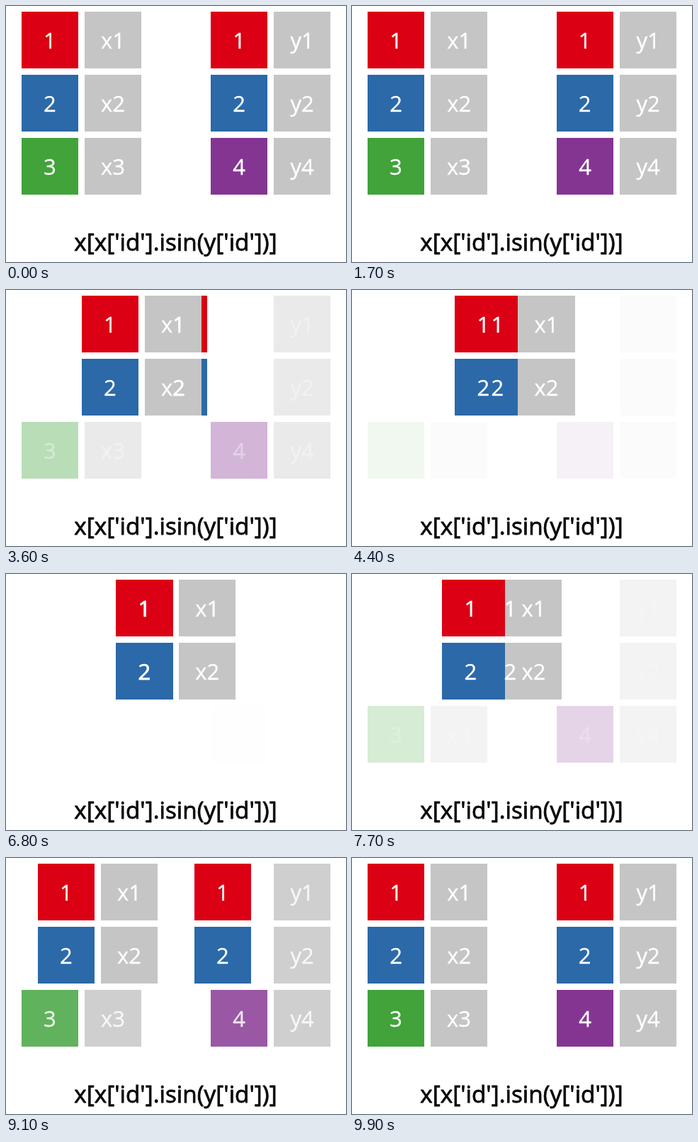
Recreate the animation shown at these times as an HTML page with a canvas. Size 480 by 361 pixels, loop 10000 ms.

```html
<!DOCTYPE html>
<html lang="en">
<head>
<meta charset="utf-8">
<title>Semi join</title>
<style>
  html, body { margin: 0; width: 100%; height: 100%; overflow: hidden; background: #fff; }
  canvas { display: block; }
</style>
</head>
<body>
<canvas id="stage" width="480" height="361"></canvas>
<script>
const ctx = document.getElementById('stage').getContext('2d');
const LOOP = 10000, STEP = 100;
const X0 = 21.8, Y0 = 8, UNIT = 89.05, SIZE = 80.1;
const FAMILY = '"Open Sans", "Noto Sans", sans-serif';
const GREY = '#c5c5c5';
const COLORS = { 1: '#db0014', 2: '#2b69a9', 3: '#41a33a', 4: '#843592' };

// shift is the horizontal travel in grid units
const tile = (label, color, col, row, shift, fades) => ({ label, color, col, row, shift, fades });
const keys = (ids, col, dir) => ids.map((id, row) =>
  tile(String(id), COLORS[id], col, row, id < 3 ? dir * 1.5 : 0, id > 2));
const values = (ids, name, col) => ids.map((id, row) => {
  const stays = name === 'x' && id < 3;
  return tile(name + id, GREY, col, row, stays ? 1.5 : 0, !stays);
});

const xIds = [1, 2, 3], yIds = [1, 2, 4];
const tiles = [
  ...keys(xIds, 0, 1),
  ...keys(yIds, 3, -1),
  ...values(xIds, 'x', 1),
  ...values(yIds, 'y', 4)
];

const clamp = v => Math.min(1, Math.max(0, v));
const sine = u => (1 - Math.cos(Math.PI * clamp(u))) / 2;
const progress = t => t < 6000 ? sine((t - 1600) / 3400) : 1 - sine((t - 6700) / 3300);

function setType(size, color, weight) {
  ctx.font = `${size}px ${FAMILY}`;
  ctx.fillStyle = ctx.strokeStyle = color;
  ctx.lineWidth = weight;
}

function write(text, x, y) {
  ctx.fillText(text, x, y);
  ctx.strokeText(text, x, y);
}

function draw(t) {
  const p = progress(t);
  const left = c => X0 + (c.col + c.shift * p) * UNIT;
  const alpha = c => c.fades ? 1 - p : 1;

  ctx.globalAlpha = 1;
  ctx.fillStyle = '#fff';
  ctx.fillRect(0, 0, 480, 361);

  for (const c of tiles) {
    const x = Math.round(left(c)), end = Math.round(left(c) + SIZE);
    ctx.globalAlpha = alpha(c);
    ctx.fillStyle = c.color;
    ctx.fillRect(x, Y0 + c.row * 89, end - x, 80);
  }

  setType(31, '#fff', 0.4);
  for (const c of tiles) {
    ctx.globalAlpha = alpha(c);
    write(c.label, left(c) + SIZE / 2, Y0 + c.row * 89 + 52);
  }

  ctx.globalAlpha = 1;
  setType(33.3, '#080808', 0.8);
  write("x[x['id'].isin(y['id'])]", 239.5, 344.5);
}

ctx.textAlign = 'center';
ctx.lineJoin = 'round';
const start = performance.now();
function tick() {
  const t = (performance.now() - start) % LOOP;
  draw(Math.floor(t / STEP) * STEP);
  requestAnimationFrame(tick);
}
tick();
</script>
</body>
</html>
```
